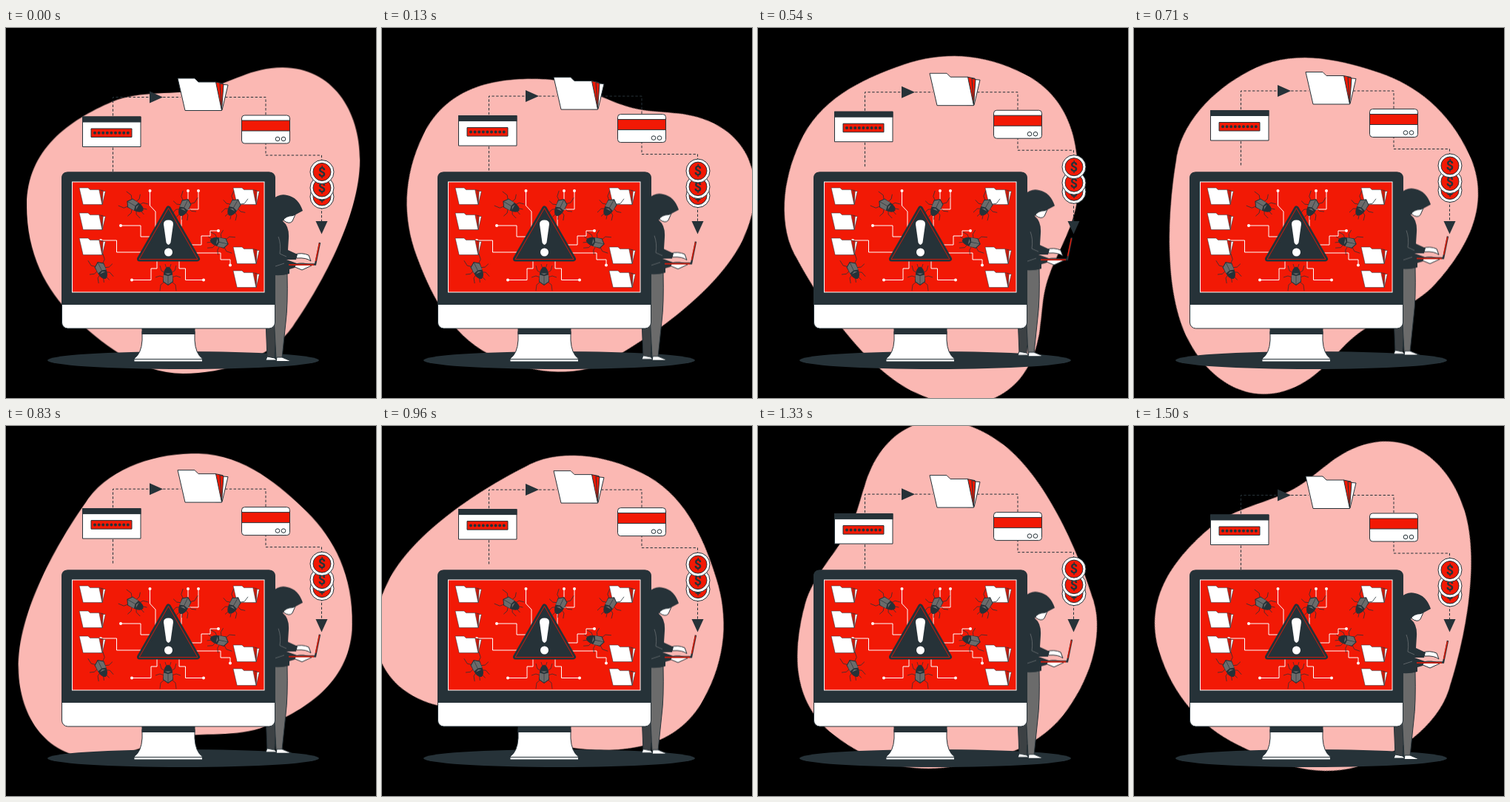
Recreate the animation shown at these times as an HTML page without scripts. Size 500 by 500 pixels, loop 1.54 s.

```html
<!DOCTYPE html>
<html lang="en">
<head>
<meta charset="utf-8">
<title>Malware attack</title>
<style>
  html, body { margin: 0; width: 100%; height: 100%; overflow: hidden; background: #000; }
  svg { display: block; width: 100%; height: 100%; }
  .dark { fill: #263238; }
  .red { fill: #f21905; }
  .white { fill: #fff; }
  .gray { fill: #6b6b6b; }
  .pink { fill: #fbb8b3; }
  .edge { stroke: #263238; stroke-width: 1; stroke-linejoin: round; }
  .line { fill: none; stroke: #263238; }
  .dash { stroke-dasharray: 3.4 2.4; }
  .wire { fill: none; stroke: #fff; stroke-width: 1; }
  .sign { font: bold 18px Roboto, Arial, sans-serif; text-anchor: middle; }

  #blob { transform-origin: 248px 252px; animation: spin 1540ms linear infinite; }
  .float { animation: float 1540ms linear infinite; }

  @keyframes spin {
    0% { transform: rotate(0deg); }
    8.44% { transform: rotate(26deg); }
    24.68% { transform: rotate(82deg); }
    46.1% { transform: rotate(155deg); }
    62.34% { transform: rotate(209deg); }
    70.6% { transform: rotate(237deg); }
    73.4% { transform: rotate(266deg); }
    75.97% { transform: rotate(275deg); }
    97.4% { transform: rotate(343deg); }
    100% { transform: rotate(351deg); }
  }
  @keyframes float {
    0% { transform: translateY(0); }
    8.44% { transform: translateY(-1.4px); }
    24.68% { transform: translateY(-4.5px); }
    37% { transform: translateY(-7.2px); }
    46.1% { transform: translateY(-8.5px); }
    52% { transform: translateY(-8.6px); }
    62.34% { transform: translateY(-7.4px); }
    75.97% { transform: translateY(-3.8px); }
    88% { transform: translateY(-1px); }
    97.4%, 100% { transform: translateY(0); }
  }
</style>
</head>
<body>
<svg viewBox="0 0 500 500">
  <defs>
    <g id="folder" class="edge">
      <path class="white" d="M58 8 68 9 60 43H50Z"/>
      <path class="red" d="M51 5 61 7 59 43H52Z"/>
      <path class="red" d="M57 7 62 8 59.5 43Z"/>
      <path class="white" d="M0 0H23L28 5H51.500L59.500 43.500H10Z"/>
    </g>
    <g id="bug">
      <path class="line" stroke-width=".7" d="M-4-7-9-10-11-17M4-7 9-10 11-17M-5-1-11-3-17-1M5-1 11-3 17-1M-5 5-10 9-11 17M5 5 10 9 11 17M-2-13-4-19M2-13 4-19"/>
      <path class="dark" d="M-6-6Q-5-14 0-15.500Q5-14 6-6L7 5 0 10-7 5Z"/>
      <path class="gray" d="M-6-4.500-.3-3V8.500L-6 4.500ZM6-4.500 .3-3V8.500L6 4.500Z"/>
      <path class="gray" d="M-4-6.500H4L0-4.500Z"/>
    </g>
    <g id="coin">
      <circle class="white edge" r="16"/>
      <circle class="red edge" r="12"/>
      <text class="sign dark" y="6.300">$</text>
    </g>
  </defs>

  <rect width="500" height="500"/>
  <path id="blob" class="pink" d="M28 240C28 165 85 125 143 100C180 84 230 91 265 83C305 74 330 53 373 53C440 53 478 110 478 178C478 256 422 354 388 403C357 447 295 467 240 467C178 467 127 424 92 391C54 355 28 305 28 240Z"/>
  <ellipse class="dark" cx="239.500" cy="449" rx="183.500" ry="12"/>

  <g class="float">
    <path class="line dash" d="M144.500 194V93.500H236M296 93.500H351V172H426.500V268"/>
    <path class="dark" d="M194 85.500 212 93.500 194 101.500Z"/>

    <rect class="white edge" x="103.500" y="120" width="78.500" height="40.500"/>
    <rect class="dark" x="103" y="119.500" width="79.500" height="8"/>
    <rect class="red edge" x="115" y="136" width="55" height="11.500"/>
    <path class="line" stroke-width="4" stroke-linecap="round" stroke-dasharray="0 5.600" d="M120 141.800H166"/>

    <use href="#folder" x="232" y="68"/>

    <rect class="white edge" x="318.500" y="118" width="65" height="38" rx="4"/>
    <rect class="red edge" x="318.500" y="125" width="65" height="14"/>
    <g class="line"><circle cx="367" cy="150" r="2.800"/><circle cx="375" cy="150" r="2.800"/></g>

    <use href="#coin" x="427" y="228"/>
    <use href="#coin" x="427" y="216"/>
    <use href="#coin" x="427" y="194.500"/>

    <g id="hacker">
      <path class="edge" fill="#3c4144" d="M351 395H366L363 446H353Z"/>
      <path class="gray edge" d="M360 332H380Q381 375 378 398L373 446H365L362 390Z"/>
      <path class="white edge" d="M353 444 363 446 366 449H351ZM366 445H373L386 450.500H365Z"/>
      <path class="white edge" d="M376 250 391 252 387 261Q383 266 375 260Z"/>
      <path class="white edge" d="M390 306Q400 303 409 307L412 315Q406 310 393 311ZM391 319Q402 316 413 321L400 327 388 322Z"/>
      <path class="dark" d="M360 232Q369 223 380 226Q395 229 401 247L388 254Q378 254 374 261Q383 268 382 284L381 300 394 306 392 313 379 313 393 318 390 324 383 326V332Q370 336 355 333V240Z"/>
      <path class="line" style="stroke:#75797b" stroke-width=".7" d="M368 282Q372 292 370 305L379 309M364 322 376 318"/>
      <path class="line" stroke-width="2.400" d="M380 319.500H418L424 290"/>
      <path class="line" style="stroke:#f21905" stroke-width="1.300" d="M382 320H416M418.500 315 423.500 291"/>
    </g>
  </g>
  <path class="dark" d="M418.500 261H434.500L426.500 278.500Z"/>

  <g id="monitor">
    <path class="white edge" d="M184 410H255V422Q256 440 265.500 447V451H173V447Q183 440 184 422Z"/>
    <path class="line" d="M173 447.500H265"/>
    <rect class="dark" x="183.500" y="405" width="72" height="9"/>
    <rect class="white edge" x="75.500" y="195" width="288" height="211" rx="8"/>
    <path class="dark" d="M75 374V203Q75 194.500 83 194.500H355Q364 194.500 364 203V374Z"/>
    <rect class="red" x="89.500" y="208" width="259.500" height="149" stroke="#fff"/>
  </g>

  <g id="wires">
    <path class="wire" d="M194.500 220V240L202 248V272M155 267H182V282H195M128 287H149.500V303H182M170 340.500H196V325H204V314M267 340.500H242.500V325H234V314M287 274H276V281H264V293H250M303 320V313H290V304H257M260 220V245H237V268M246 220V245"/>
    <path class="wire" style="stroke-width:4;stroke-linecap:round" d="M194.500 220h0M155 267h0M128 287h0M170 340.500h0M267 340.500h0M287 274h0M303 320.500h0M260 220h0M246 220h0"/>
  </g>

  <g id="files">
    <use href="#folder" transform="translate(99 216) scale(.52)"/>
    <use href="#folder" transform="translate(99 250) scale(.52)"/>
    <use href="#folder" transform="translate(99 284) scale(.52)"/>
    <use href="#folder" transform="translate(307 216) scale(.52)"/>
    <use href="#folder" transform="translate(307 296) scale(.52)"/>
    <use href="#folder" transform="translate(307 328) scale(.52)"/>
  </g>

  <g id="bugs">
    <use href="#bug" transform="translate(172 239) rotate(120)"/>
    <use href="#bug" transform="translate(242 240) rotate(205)"/>
    <use href="#bug" transform="translate(309 240) rotate(210)"/>
    <use href="#bug" transform="translate(128 325) rotate(155)"/>
    <use href="#bug" transform="translate(291 290) rotate(-78)"/>
    <use href="#bug" transform="translate(219 338)"/>
  </g>

  <g id="warning">
    <path class="dark" stroke="#263238" stroke-width="7" stroke-linejoin="round" d="M219.500 244 258.500 312H180.500Z"/>
    <path fill="none" stroke="#f21905" stroke-width=".8" stroke-linejoin="round" d="M219.500 243.500 259 312.500H180Z"/>
    <path class="white" d="M213 265Q213 259.500 219.500 259.500Q226 259.500 226 265L222.500 290Q219.500 296 216.500 290Z"/>
    <circle class="white" cx="219.500" cy="303" r="5.500"/>
  </g>
</svg>
</body>
</html>
```
